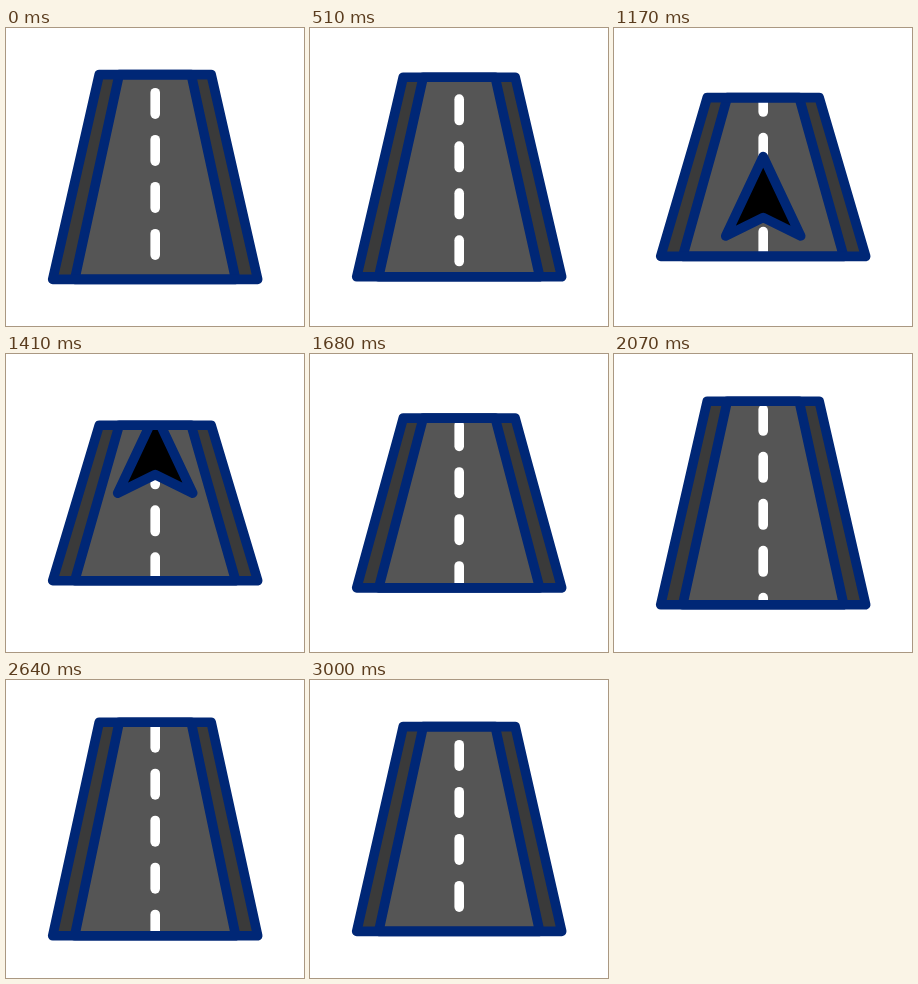
These frames come from a looping animation (298x298 px, 3.3 s). An HTML page with a canvas:

```html
<!DOCTYPE html>
<html lang="en">
<head>
<meta charset="utf-8">
<title>Road</title>
<style>
  html, body { margin: 0; width: 100%; height: 100%; overflow: hidden; background: #fff; }
  canvas { display: block; }
</style>
</head>
<body>
<canvas id="stage" width="298" height="298"></canvas>
<script>
const ctx = document.getElementById('stage').getContext('2d');
const LOOP = 3300, STEP = 30, START = 300, STEPS = 90;
const BLUE = '#002776', LINE = 9.6;
const DASH = 21.4, PERIOD = 47, DASH_START = -84.3;

// [step, half height of the road]
const heights = [[0, 102.4], [35, 77.4], [70, 109.2], [90, 102.4]];

const smooth = x => x * x * (3 - 2 * x);

function heightAt(step) {
  const i = heights.findIndex(([end], k) => k > 0 && step <= end);
  const [t0, a] = heights[i - 1], [t1, b] = heights[i];
  return a + (b - a) * smooth((step - t0) / (t1 - t0));
}

function trace(points, closed = true) {
  ctx.beginPath();
  points.forEach(([x, y]) => ctx.lineTo(x, y));
  if (closed) ctx.closePath();
}

// Symmetric trapezoid with the given half widths
function trapezoid(top, bottom, h) {
  trace([[-top, -h], [top, -h], [bottom, h], [-bottom, h]]);
}

function stroke(color) {
  ctx.strokeStyle = color;
  ctx.stroke();
}

function fill(color) {
  ctx.fillStyle = color;
  ctx.fill();
}

function drawDashes(shift, h) {
  const first = DASH_START + shift % PERIOD - PERIOD;
  for (let y = first; y < h + LINE; y += PERIOD) {
    trace([[0, y], [0, y + DASH]], false);
    stroke('#fff');
  }
}

function drawArrow(y) {
  trace([[0, y], [37.5, y + 79.5], [0, y + 61], [-37.5, y + 79.5]]);
  fill('#000');
  stroke(BLUE);
}

function draw(time) {
  const elapsed = Math.floor(time % LOOP / STEP) * STEP - START;
  const step = Math.min(Math.max(elapsed / STEP, 0), STEPS);
  const travel = smooth(step / STEPS);
  const h = heightAt(step);

  ctx.setTransform(1, 0, 0, 1, 0, 0);
  ctx.fillStyle = '#fff';
  ctx.fillRect(0, 0, 298, 298);
  ctx.translate(149.2, 149);
  ctx.lineWidth = LINE;
  ctx.lineCap = ctx.lineJoin = 'round';

  ctx.save();
  trapezoid(56, 102.5, h);
  ctx.clip();
  fill('#3a3a3a');
  trapezoid(36, 80.5, h);
  fill('#555');
  drawDashes(travel * 8 * PERIOD, h);
  drawArrow(116 - travel * 558);
  ctx.restore();

  trapezoid(36, 80.5, h);
  stroke(BLUE);
  trapezoid(56, 102.5, h);
  stroke(BLUE);
}

function tick() {
  draw(performance.now());
  requestAnimationFrame(tick);
}
tick();
</script>
</body>
</html>
```
